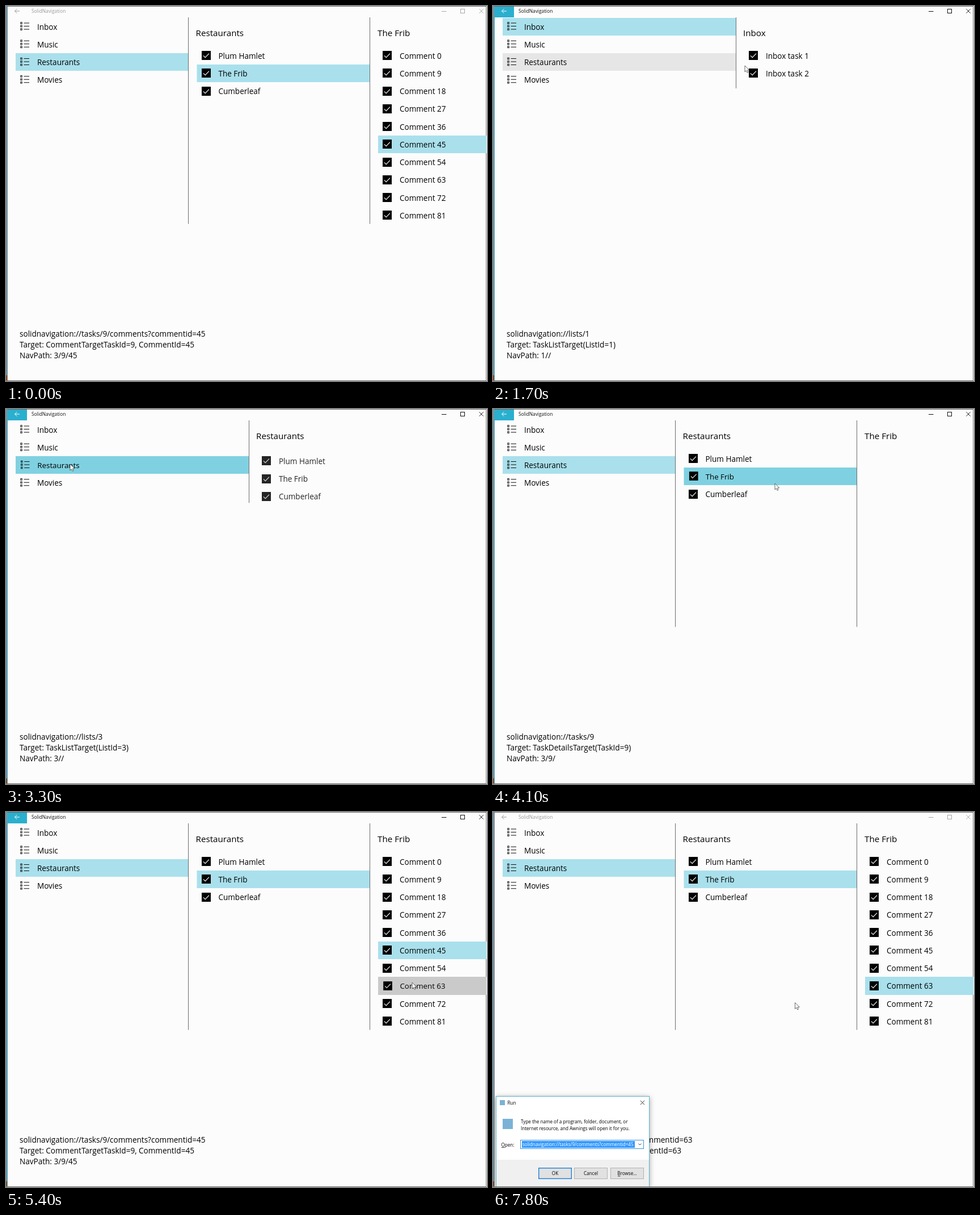
An HTML page with a canvas for the animation above (8000 ms loop, 848x660 px).

```html
<!DOCTYPE html>
<html lang="en">
<head>
<meta charset="utf-8">
<title>SolidNavigation</title>
<style>
html, body { margin: 0; width: 848px; height: 660px; overflow: hidden; background: #fcfcfc; }
canvas { display: block; }
</style>
</head>
<body>
<canvas id="stage" width="848" height="660"></canvas>
<script>
const ctx = document.getElementById('stage').getContext('2d');
const LOOP = 8000, STEP = 100, ROW = 31.25;
const FONT = '"Open Sans", "Noto Sans", sans-serif';
const SIZE = 13.55, HEAD = 15.2, SMALL = 8.1;
const SELECTED = '#a9e0ec', SELECTED_HOVER = '#7fd1e1', HOVER = '#e6e6e6', PRESSED = '#cacaca';
const RUN_AT = 7300, ACTIVE_AT = 900;

const lists = ['Inbox', 'Music', 'Restaurants', 'Movies'];
const tasks = {
  1: [{ id: 1, name: 'Inbox task 1' }, { id: 2, name: 'Inbox task 2' }],
  3: [{ id: 8, name: 'Plum Hamlet' }, { id: 9, name: 'The Frib' }, { id: 10, name: 'Cumberleaf' }]
};

// Each view: time shown, then the chosen list, task and comment.
const views = [
  { at: -1000, list: 3, task: 9, comment: 45 },
  { at: 1000, list: 1 },
  { at: 2200, list: 1, task: 1 },
  { at: 3100, list: 3 },
  { at: 4000, list: 3, task: 9 },
  { at: 4800, list: 3, task: 9, comment: 45 },
  { at: 5500, list: 3, task: 9, comment: 63 }
];

const clicks = [
  { down: 900, up: 1000, col: 0, row: 0 },
  { down: 2000, up: 2200, col: 1, row: 0 },
  { down: 3000, up: 3100, col: 0, row: 2 },
  { down: 3900, up: 4000, col: 1, row: 1 },
  { down: 4700, up: 4800, col: 2, row: 5 },
  { down: 5400, up: 5500, col: 2, row: 7 }
];

// Pointer path: time, x, y
const path = [
  [300, 300, 330], [800, 90, 38], [1100, 90, 38], [1300, 150, 62], [1500, 300, 98],
  [1700, 444, 105], [2000, 507, 96], [2600, 507, 96], [2900, 113, 97], [3400, 113, 97],
  [3800, 497, 131], [4100, 497, 131], [4500, 714, 243], [4900, 714, 243],
  [5200, 716, 300], [5900, 716, 300], [6200, 532.5, 335.5]
];

const clamp = v => Math.max(0, Math.min(1, v));

function pointer(t) {
  if (t < path[0][0]) return null;
  for (let i = 1; i < path.length; i++) {
    const [t0, x0, y0] = path[i - 1], [t1, x1, y1] = path[i];
    if (t <= t1) {
      const k = clamp((t - t0) / (t1 - t0));
      return { x: x0 + (x1 - x0) * k, y: y0 + (y1 - y0) * k };
    }
  }
  const last = path[path.length - 1];
  return { x: last[1], y: last[2] };
}

function rect(x, y, w, h, fill) {
  ctx.fillStyle = fill;
  ctx.fillRect(x, y, w, h);
}

function frame(x, y, w, h, stroke, width = 1) {
  ctx.strokeStyle = stroke;
  ctx.lineWidth = width;
  ctx.strokeRect(x, y, w, h);
}

function line(points, stroke, width = 1) {
  ctx.strokeStyle = stroke;
  ctx.lineWidth = width;
  ctx.beginPath();
  points.forEach(([x, y]) => ctx.lineTo(x, y));
  ctx.stroke();
}

function text(s, x, y, size = SIZE, fill = '#000', align = 'left') {
  ctx.font = `${size}px ${FONT}`;
  ctx.fillStyle = fill;
  ctx.textAlign = align;
  ctx.fillText(s, x, y);
}

function cross(x, y, r, color) {
  line([[x - r, y - r], [x + r, y + r]], color, 0.9);
  line([[x + r, y - r], [x - r, y + r]], color, 0.9);
}

function listIcon(x, y) {
  for (let i = 0; i < 3; i++) {
    const cy = y + 9.5 + i * 5.5;
    frame(x + 0.8, cy - 1.3, 2.4, 2.6, '#111');
    rect(x + 6.5, cy - 0.5, 9.5, 1, '#111');
  }
}

function checkIcon(x, y) {
  const top = Math.round(y + 7.5);
  rect(x, top, 16, 16, '#000');
  line([[x + 3, top + 8.4], [x + 6.2, top + 11.6], [x + 13, top + 4.6]], '#fff', 1.1);
}

function pressScale(t, col, row) {
  const c = clicks.find(c => c.col === col && c.row === row && t >= c.down && t < c.up + 300);
  return c ? 0.98 + 0.02 * clamp((t - c.up - 150) / 150) : 1;
}

// A column of rows; x and right bound the highlight.
function rows(t, col, names, sel, x, right, top, icon) {
  const hover = pointer(t - STEP);
  names.forEach((name, i) => {
    const y = top + i * ROW;
    const over = hover && hover.x >= x && hover.x < right && hover.y >= y && hover.y < y + ROW;
    const down = clicks.some(c => c.col === col && c.row === i && t >= c.down && t < c.up);
    let fill = null;
    if (i === sel) fill = over ? SELECTED_HOVER : SELECTED;
    else if (down) fill = PRESSED;
    else if (over) fill = HOVER;
    const edge = Math.round(y);
    if (fill) rect(x, edge, right - x, Math.round(y + ROW) - edge, fill);

    ctx.font = `${SIZE}px ${FONT}`;
    ctx.textAlign = 'left';
    const width = 38 + ctx.measureText(name).width;
    const k = pressScale(t, col, i), cx = x + 8 + width / 2, cy = y + ROW / 2;
    ctx.save();
    ctx.translate(cx, cy);
    ctx.scale(k, k);
    ctx.translate(-cx, -cy);
    icon(Math.round(x + 8.4), y);
    text(name, x + 37.9, y + 21);
    ctx.restore();
  });
}

// New lists fade in while sliding up.
function entering(age, draw) {
  const d = age - 110;
  if (d < 0) return;
  ctx.save();
  ctx.globalAlpha = clamp(d / 106);
  draw(d > 290 ? 0 : 40 * Math.exp(-d / 41));
  ctx.restore();
}

function divider(x, bottom) {
  rect(Math.floor(x), 20, 1, bottom - 20, '#6c6c6c');
}

function status(v) {
  const { list, task, comment } = v;
  if (comment) return [
    `solidnavigation://tasks/${task}/comments?commentid=${comment}`,
    `Target: CommentTargetTaskId=${task}, CommentId=${comment}`,
    `NavPath: ${list}/${task}/${comment}`];
  if (task) return [
    `solidnavigation://tasks/${task}`,
    `Target: TaskDetailsTarget(TaskId=${task})`,
    `NavPath: ${list}/${task}/`];
  return [
    `solidnavigation://lists/${list}`,
    `Target: TaskListTarget(ListId=${list})`,
    `NavPath: ${list}//`];
}

function content(t) {
  let index = 0;
  views.forEach((v, i) => { if (t >= v.at) index = i; });
  const v = views[index], age = t - v.at;
  const items = tasks[v.list];
  const split = v.task ? 321.5 : 428;
  const taskRow = items.findIndex(item => item.id === v.task);

  rows(t, 0, lists, v.list - 1, 17, split, 20.5, listIcon);
  text(lists[v.list - 1], split + 13, 53, HEAD);
  const drawTasks = dy => rows(t, 1, items.map(item => item.name), taskRow,
    split + 15, v.task ? 641 : 847, 71.5 + dy, checkIcon);

  if (v.task) {
    divider(split, 383.5);
    divider(641, 383.5);
    drawTasks(0);
    text(items[taskRow].name, 655, 53, HEAD);
    const names = Array.from({ length: 10 }, (_, i) => `Comment ${i * v.task}`);
    const sel = v.comment ? v.comment / v.task : -1;
    const drawComments = dy => rows(t, 2, names, sel, 656, 847, 71.5 + dy, checkIcon);
    if (v.comment) drawComments(0);
    else entering(age, drawComments);
  } else {
    divider(split, Math.max(145, 71.5 + items.length * ROW));
    entering(age, drawTasks);
  }
  status(v).forEach((s, i) => text(s, 24, 582.4 + i * 18.65));
}

function windowChrome(active) {
  const ink = active ? '#111' : '#a6a6a6';
  if (active) rect(2, 1, 35, 19, '#2aafce');
  const arrow = active ? '#fff' : '#999';
  line([[15.5, 9], [24, 9]], arrow);
  line([[19.3, 5.2], [15.5, 9], [19.3, 12.8]], arrow);
  text('SolidNavigation', 45, 12.4, 8.3, active ? '#111' : '#999');
  line([[768, 9.5], [776.5, 9.5]], ink);
  frame(801.5, 5.5, 7, 7, ink);
  cross(838, 9, 3.7, ink);

  rect(0, 0, 2, 660, '#6d97a8');
  rect(2, 0, 1, 660, active ? '#4ba6bd' : '#8b8b8b');
  rect(2, 0, 845, 1, '#666');
  rect(846, 0, 1, 660, '#777');
  rect(2, 659, 845, 1, '#666');
  rect(0, 650, 2, 9, '#8a4a20');
}

function button(x, label, primary) {
  rect(x, 626, 59, 20, '#e1e1e1');
  if (primary) frame(x + 0.7, 626.7, 57.6, 18.6, '#1b82d6', 1.4);
  else frame(x + 0.5, 626.5, 58, 19, '#b2b2b2');
  text(label, x + 29.5, 639.2, SMALL, '#000', 'center');
}

function runDialog(t) {
  ctx.save();
  ctx.shadowColor = 'rgba(0,0,0,.35)';
  ctx.shadowBlur = 9;
  ctx.shadowOffsetY = 2;
  rect(5, 500, 271, 160, '#fff');
  ctx.restore();
  rect(6, 612, 269, 48, '#f0f0f0');
  frame(5.5, 500.5, 270, 170, '#5fb4c6');

  rect(12, 507, 9, 9, '#7ab3d6');
  text('Run', 25.5, 514.7, SMALL);
  cross(263.5, 511.5, 3.6, '#222');
  rect(17, 540, 18, 18, '#7ab3d6');
  text('Type the name of a program, folder, document, or', 49, 548.3, SMALL);
  text('Internet resource, and Awnings will open it for you.', 49, 559.8, SMALL);

  text('Open:', 14.5, 589, SMALL);
  rect(15, 590, 5.5, 0.8, '#000');
  frame(48.5, 577.5, 217, 15, '#3b93d6');
  rect(51, 579, 199, 12, '#3399ff');
  text('solidnavigation://tasks/9/comments?commentid=45', 52, 587.7, SMALL, '#fff');
  if (t < RUN_AT + 500) rect(249, 578, 1, 12, '#000');
  line([[256.5, 583.5], [259, 586], [261.5, 583.5]], '#444');

  button(80, 'OK', true);
  button(143, 'Cancel');
  button(207, 'Browse...');
  rect(220, 640.5, 4.5, 0.8, '#000');
  rect(2, 659, 845, 1, '#666');
}

function drawPointer(p) {
  ctx.save();
  ctx.translate(p.x, p.y);
  ctx.beginPath();
  [[0, 0], [0, 11], [2.5, 8.7], [4.2, 12.4], [6, 11.6], [4.4, 8], [7.8, 7.8]]
    .forEach(([x, y]) => ctx.lineTo(x, y));
  ctx.closePath();
  ctx.fillStyle = '#fff';
  ctx.fill();
  ctx.strokeStyle = '#444';
  ctx.lineWidth = 0.8;
  ctx.stroke();
  ctx.restore();
}

function draw(t) {
  rect(0, 0, 848, 660, '#fcfcfc');
  windowChrome(t >= ACTIVE_AT && t < RUN_AT);
  content(t);
  if (t >= RUN_AT) runDialog(t);
  const p = pointer(t);
  if (p) drawPointer(p);
}

const start = performance.now();
function tick() {
  const t = (performance.now() - start) % LOOP;
  draw(Math.floor(t / STEP) * STEP);
  requestAnimationFrame(tick);
}
tick();
</script>
</body>
</html>
```
